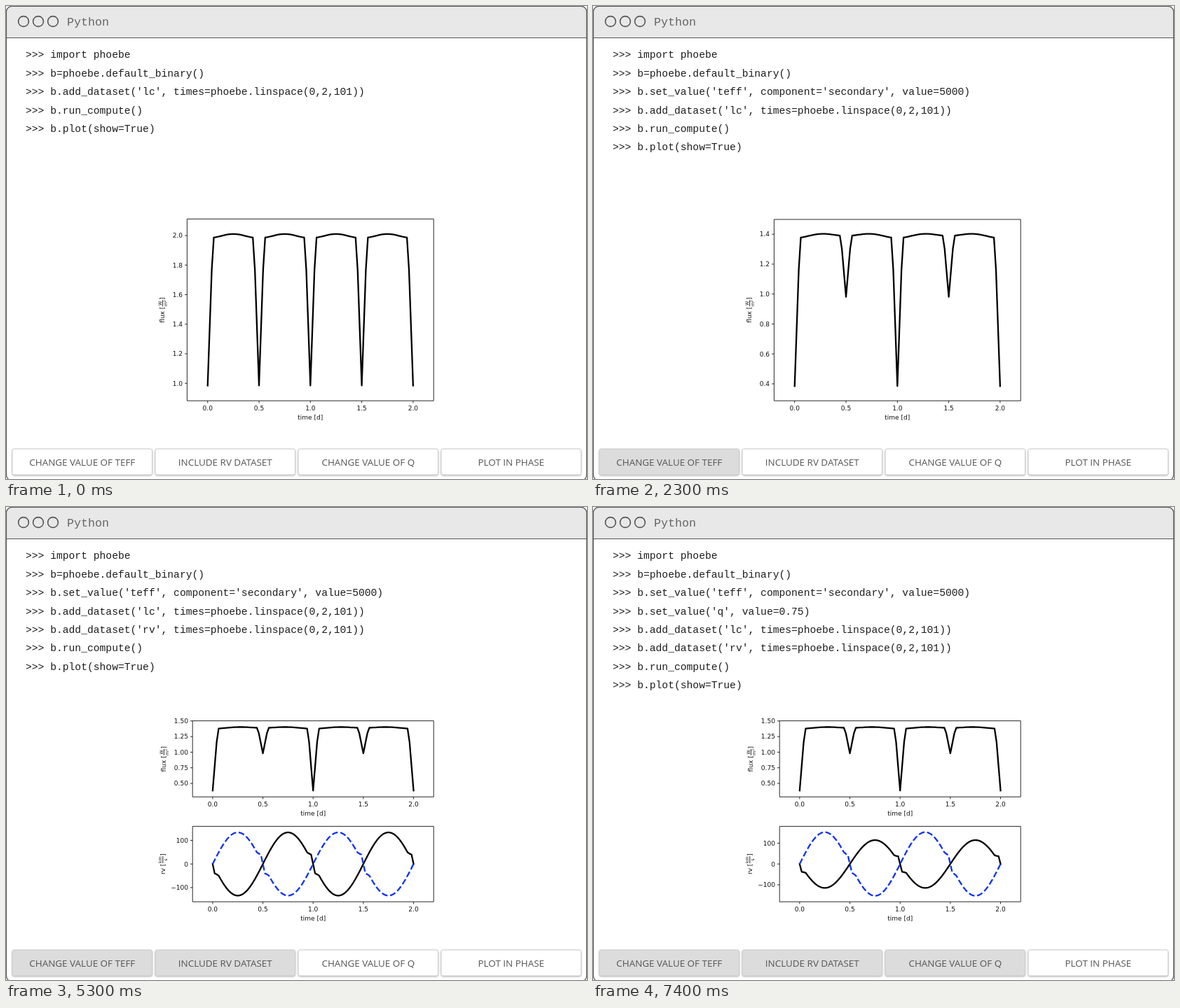
Animation of 829x676 px, one loop 8 s. Source, as an HTML page:

```html
<!DOCTYPE html>
<html lang="en">
<head>
<meta charset="utf-8">
<title>Python</title>
<style>
  html, body { margin: 0; width: 100%; height: 100%; overflow: hidden; background: #fff; }
  svg { display: block; width: 100vw; height: 100vh; }
  .code { font: 14.67px "Liberation Mono", monospace; fill: #1c1c1c; }
  .title { font: 16.67px "Liberation Mono", monospace; fill: #666; }
  .button rect { fill: #fff; stroke: #ccc; filter: drop-shadow(.6px 1px .8px rgba(0, 0, 0, .28)); }
  .button.on rect { fill: #dcdcdc; }
  .button text { font: 13.45px "Open Sans", sans-serif; fill: #555; text-anchor: middle; }
  .plot { font: 9px "DejaVu Sans", sans-serif; fill: #111; }
  .axes { fill: none; stroke: #111; stroke-width: .9; }
  .curve { fill: none; stroke-width: 2.3; stroke-linejoin: round; }
  .small { font-size: 6.3px; text-anchor: middle; }
  .mid { text-anchor: middle; }
  .end { text-anchor: end; }
</style>
</head>
<body>
<svg viewBox="0 0 829 676">
  <rect x=".5" y=".5" width="828" height="677.5" rx="8" fill="#fff" stroke="#555" stroke-width="1.2"/>
  <path d="M.5 45.5V8.5a8 8 0 0 1 8-8h812a8 8 0 0 1 8 8v37z" fill="#e8e8e8" stroke="#555" stroke-width="1.2"/>
  <g fill="none" stroke="#555" stroke-width="1.6">
    <circle cx="25" cy="22" r="7.4"/><circle cx="46" cy="22" r="7.4"/><circle cx="67" cy="22" r="7.4"/>
  </g>
  <text class="title" x="87" y="28">Python</text>
  <g id="scene"></g>
</svg>
<script>
const scene = document.getElementById('scene');
const RIGHT = 610.2;
const BUTTONS = ['CHANGE VALUE OF TEFF', 'INCLUDE RV DATASET', 'CHANGE VALUE OF Q', 'PLOT IN PHASE'];
const STARTS = [0, 500, 3500, 6500], LOOP = 8000;

const text = (cls, x, y, s) => `<text class="${cls}" x="${x}" y="${y}">${s}</text>`;

// Distance in steps of 0.02 d from the eclipse centred at the given phase
const stepsFrom = (t, phase) => Math.round(Math.abs(t - phase - Math.round(t - phase)) * 50);

// Light curve: two V-shaped eclipses cut into a gently varying level
const lightCurve = ({ level, bulge, tilt, eclipses }) => t => {
  for (const [phase, floor, slope] of eclipses) {
    const n = stepsFrom(t, phase);
    if (n < 3) return floor + slope * n * .02;
  }
  return level - bulge * Math.cos(4 * Math.PI * t) - tilt * Math.cos(2 * Math.PI * t);
};

// Radial velocity: a sine with a kink while the star is eclipsed
const velocity = (amplitude, eclipse) => t => {
  const v = amplitude * Math.sin(2 * Math.PI * t);
  const kink = [0, 23, 10.5][stepsFrom(t, eclipse)] || 0;
  return v + Math.sign(v) * kink;
};

const equalFlux = lightCurve({ level: 1.996, bulge: .0139, tilt: 0, eclipses: [[0, .985, 19.6], [.5, .985, 19.6]] });
const coolFlux = lightCurve({ level: 1.392, bulge: .0101, tilt: .007, eclipses: [[0, .385, 19.45], [.5, .982, 8]] });

function yLabel(x, y, name, top, bottom, start, width, drop) {
  const barStart = start + width + .5, bar = top === 'W' ? 9 : 10, mid = barStart + bar / 2;
  return `<g transform="translate(${x} ${y}) rotate(-90)">${text('', start, 0, name + ' [')}
    ${text('small', mid, -4.2, top)}${text('small', mid, drop, bottom)}
    <path class="axes" stroke-width=".6" d="M${barStart} -2.8h${bar}"/>${text('', barStart + bar + .4, 0, ']')}</g>`;
}
const fluxLabel = (x, y) => yLabel(x, y, 'flux', 'W',
  'm<tspan font-size="4.4" dy="-2">2</tspan>', -18.4, 23, 3.8);
const rvLabel = (x, y) => yLabel(x, y, 'rv', 'km', 's', -14.8, 15.4, 3);

function plot({ left, top, bottom, zero, scale, ticks, digits, label, curves }) {
  const width = RIGHT - left;
  const px = t => left + width * (1 + 5 * t) / 12;
  const py = v => zero - v * scale;
  let axes = `M${left} ${top}H${RIGHT}V${bottom}H${left}z`, out = '';
  for (let t = 0; t <= 2; t += .5) {
    axes += `M${px(t)} ${bottom}v3.2`;
    out += text('mid', px(t), bottom + 13.5, t.toFixed(1));
  }
  for (const v of ticks) {
    axes += `M${left} ${py(v)}h-3.2`;
    out += text('end', left - 6.3, py(v) + 3.3, v.toFixed(digits).replace('-', '\u2212'));
  }
  out += text('mid', (left + RIGHT) / 2, bottom + 26.8, 'time [d]') + label;
  for (const [value, style] of curves) {
    const points = Array.from({ length: 101 }, (_, i) =>
      `${px(i / 50).toFixed(2)},${py(value(i / 50)).toFixed(2)}`);
    out += `<polyline class="curve" ${style} points="${points.join(' ')}"/>`;
  }
  return `<g class="plot">${out}<path class="axes" d="${axes}"/></g>`;
}

const SOLID = 'stroke="#000" stroke-linecap="square"';
const DASHED = 'stroke="#0d31f5" stroke-dasharray="8.5 3.7"';

const fluxPlot = (top, zero, scale, ticks, curve) => plot({
  left: 258.4, top, bottom: 564.2, zero, scale, ticks, digits: 1,
  label: fluxLabel(226.4, 434.4), curves: [[curve, SOLID]]
});
const stackedPlots = (primary, secondary, scale) => plot({
  left: 266.2, top: 305.6, bottom: 414.3, zero: 439.6, scale: 89.2,
  ticks: [.5, .75, 1, 1.25, 1.5], digits: 2,
  label: fluxLabel(228.2, 360), curves: [[coolFlux, SOLID]]
}) + plot({
  left: 266.2, top: 456.4, bottom: 564.2, zero: 510.2, scale,
  ticks: [-100, 0, 100], digits: 0, label: rvLabel(226.6, 510.3),
  curves: [[velocity(-primary, 0), SOLID], [velocity(secondary, .5), DASHED]]
});

const PLOTS = [
  fluxPlot(304.4, 750.6, 211.3, [1, 1.2, 1.4, 1.6, 1.8, 2], equalFlux),
  fluxPlot(305, 625.5, 213.8, [.4, .6, .8, 1, 1.2, 1.4], coolFlux),
  stackedPlots(134, 134, .3375),
  stackedPlots(115, 153, .2975)
];

// Each line of code with the step at which it appears
const CODE = [
  [0, 'import phoebe'],
  [0, 'b=phoebe.default_binary()'],
  [1, "b.set_value('teff', component='secondary', value=5000)"],
  [3, "b.set_value('q', value=0.75)"],
  [0, "b.add_dataset('lc', times=phoebe.linspace(0,2,101))"],
  [2, "b.add_dataset('rv', times=phoebe.linspace(0,2,101))"],
  [0, 'b.run_compute()'],
  [0, 'b.plot(show=True)']
];

function render(step) {
  const code = CODE.filter(([since]) => since <= step)
    .map(([, line], i) => text('code', 28, 74.4 + i * 26.4, '&gt;&gt;&gt; ' + line));
  const buttons = BUTTONS.map((name, i) => `<g class="button ${i < step ? 'on' : ''}">
    <rect x="${9 + i * 204}" y="633" width="199.5" height="37" rx="2.5"/>
    ${text('', 108.8 + i * 204, 657, name)}</g>`);
  scene.innerHTML = code.join('') + PLOTS[step] + buttons.join('');
}

let shown = -1;
function tick() {
  const time = performance.now() % LOOP;
  const step = STARTS.filter(start => start <= time).length - 1;
  if (step !== shown) render(shown = step);
  requestAnimationFrame(tick);
}
tick();
</script>
</body>
</html>
```
